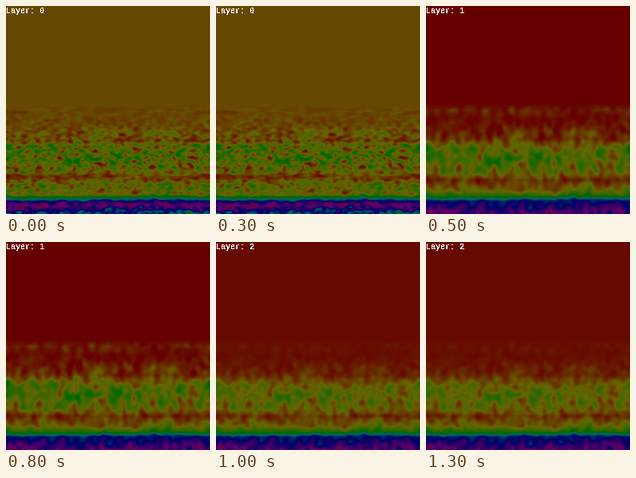
A matplotlib script that plays this animation: 256 px wide and 260 px high, repeating every 1.5 s.

```python
import numpy as np
import matplotlib.pyplot as plt
from matplotlib.animation import FuncAnimation
from matplotlib.colors import hsv_to_rgb

W, H, DPI = 256, 260, 100
ROWS, COLS = np.mgrid[0:H, 0:W]

# Each stop is (row, mean hue in degrees, hue spread).
FINE = [(122, 43, 0), (131, 39, 5), (145, 40, 5), (160, 49, 13),
        (168, 36, 15), (174, 74, 24), (192, 76, 25), (208, 50, 19),
        (213, 25, 14), (223, 66, 18), (235, 60, 13), (240, 155, 8),
        (244, 255, 12), (249, 300, 18), (259, 205, 28)]
BROAD = [(122, 0, 0), (130, 17, 9), (140, 5, 5), (157, 22, 12),
         (166, 25, 13), (178, 74, 18), (190, 82, 20), (208, 56, 15),
         (217, 18, 11), (230, 55, 11), (237, 104, 8), (243, 232, 10),
         (259, 288, 22)]
# Patches are (x, y, width, height, hue shift).
PATCHES = [(122, 160, 14, 5, 19), (38, 130, 18, 3, 8), (155, 161, 9, 9, -9)]


def smooth_noise(seed, sx, sy):
    """Unit-variance noise blurred by a Gaussian of the given sigmas."""
    white = np.random.default_rng(seed).standard_normal((H, W))
    fy = np.fft.fftfreq(H)[:, None]
    fx = np.fft.fftfreq(W)[None, :]
    blur = np.exp(-2 * np.pi ** 2 * ((sx * fx) ** 2 + (sy * fy) ** 2))
    noise = np.fft.ifft2(np.fft.fft2(white) * blur).real
    return noise / noise.std()


def bump(x, y, w, h):
    return np.exp(-((COLS - x) / w) ** 2 - ((ROWS - y) / h) ** 2)


def texture(layer):
    if layer == 0:
        # Thin horizontal streaks take over in two bands.
        band = bump(0, 130, 1e9, 7) + 0.7 * bump(0, 212, 1e9, 5)
        streaks = smooth_noise(21, 4.5, 1.1)
        return smooth_noise(8, 2.2, 1.5) * (1 - 0.8 * band) + streaks * band
    mix = layer / 4
    return ((1 - mix) * smooth_noise(8, 2.8, 4.2)
            + mix * smooth_noise(8, 2.5, 2.3))


def layer_image(layer):
    row, mean, spread = np.array(BROAD if layer else FINE, float).T
    rows = ROWS + 0.6 * smooth_noise(5, 5, 30) * (ROWS > 225)
    hue = np.interp(rows, row, mean)
    hue += np.interp(rows, row, spread) * texture(layer)
    for *place, shift in PATCHES:
        hue += shift * bump(*place)
    if layer:
        hue += 24 * bump(225, 252, 22, 9)
    hue = np.clip(hue, 0 if layer else 8, np.where(ROWS < 234, 118, 355))
    if layer == 2:
        hue = 6 + hue * np.interp(ROWS, [130, 180, 235], [0.25, 0.74, 0.97])
    hsv = np.dstack([hue / 360, np.ones((H, W)), np.full((H, W), 0.4)])
    return hsv_to_rgb(hsv)


images = [layer_image(n) for n in range(3)]

fig = plt.figure(figsize=(W / DPI, H / DPI), dpi=DPI)
ax = fig.add_axes([0, 0, 1, 1])
ax.axis("off")
picture = ax.imshow(images[0], extent=(0, W, H, 0), aspect="auto",
                    interpolation="nearest")
label = ax.text(0, 9, "", color="white", family="Liberation Mono",
                weight="bold", size=10 * 72 / DPI, va="baseline",
                antialiased=False)


def update(n):
    picture.set_data(images[n])
    label.set_text(f"Layer: {n}")
    return picture, label


anim = FuncAnimation(fig, update, frames=len(images), interval=500,
                     repeat=True, repeat_delay=0)
plt.show()
```
